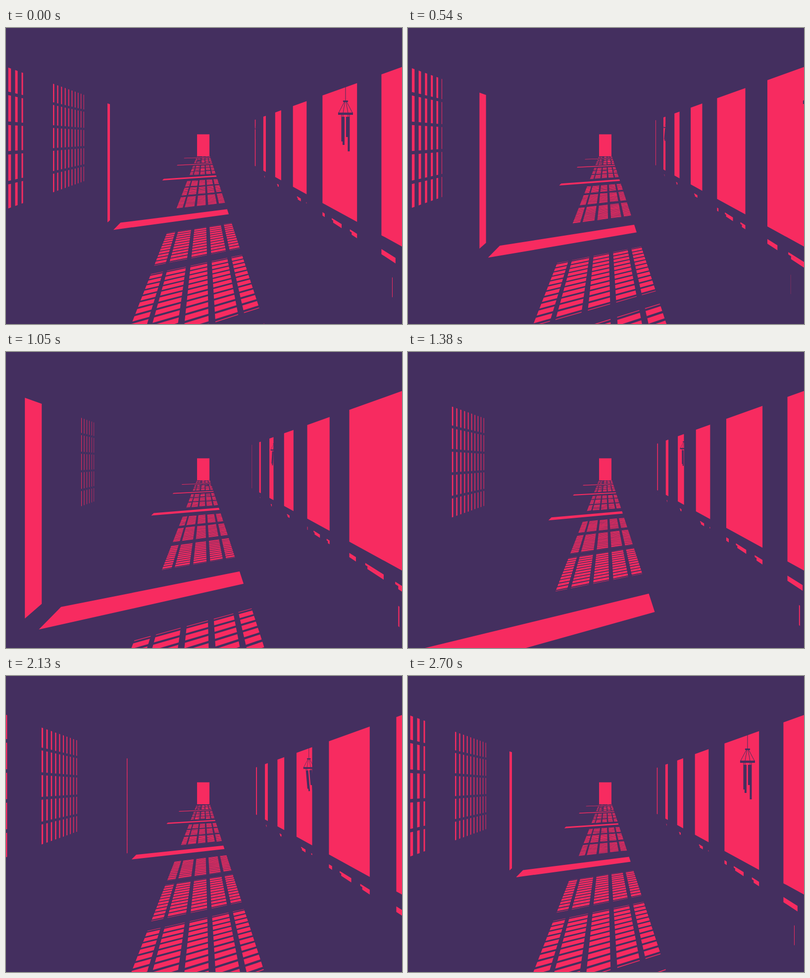
Write an HTML page that moves like this. It is 800x600 px and loops after 2.73 s.

```html
<!DOCTYPE html>
<html>
<head>
<meta charset="utf-8">
<style>
  html, body { margin: 0; height: 100%; overflow: hidden; background: #442f5f; }
  svg { display: block; width: 800px; height: 600px; }
</style>
</head>
<body>
<svg viewBox="0 0 800 600" fill="#f72b60">
  <path d="M386 215.5H411V260H386Z"/>
  <path id="floor"/>
  <path id="walls"/>
  <g id="chimes" fill="#442f5f"></g>
</svg>
<script>
const VX = 400, VY = 223;   // vanishing point
const LOOP = 2730, STEP = 30;
const el = id => document.getElementById(id);
const poly = pts => 'M' + pts.map(p => p.map(n => n.toFixed(2)).join(' ')).join('L') + 'Z';

// Distance from the vanishing point for a plane constant c at depth z.
const reach = (c, z) => 1 / Math.max(c * z, 1 / 420);

// Wall piece between reaches a < b, bounded by rays of slope top and bottom.
const wallPiece = (side, a, b, top, bottom) => a >= b ? '' : poly([
  [VX + side * a, VY + top * a], [VX + side * b, VY + top * b],
  [VX + side * b, VY + bottom * b], [VX + side * a, VY + bottom * a]]);

function rightWall(u) {
  let d = '';
  for (let n = 0; n < 12; n++) {
    const z = .5025 + n / 4 - u;
    if (z <= 0) continue;
    const far = reach(.005552, z), near = reach(.00636, z - .244);
    if (far >= near) continue;
    const piece = (a, b, top, bottom) =>
      wallPiece(1, Math.max(a, far), Math.min(b, near), top, bottom);
    const start = offset => reach(.00579, z - offset);
    const end = offset => reach(.00606, z - offset);
    d += piece(far, near, -.36, .55);
    d += piece(far, end(.076), .628, .657);
    for (const [from, to] of [[.0835, end(.159)], [.1665, near]])
      d += piece(start(from), to, .628, .641) + piece(start(from + .007), to, .641, .657);
  }
  // Slivers between the balusters, five per window
  for (let n = 0; n < 40; n++) {
    const z = .4386 + n / 24 - u;
    if (z < .4 || n % 6 === 1) continue;
    const a = reach(.006, z);
    d += wallPiece(1, a, a + (a - 370) * .1, .743, .848);
  }
  return d;
}

const ROWS = [[-.361, -.238], [-.22, -.085], [-.067, .067], [.085, .22], [.238, .361]];

function leftWall(u) {
  let d = '';
  for (let slot = -2; slot < 5; slot++) {
    if (slot === 1) continue;   // doorway
    const shift = u - slot / 4;
    const limit = .00302 + (.2 - shift) * .00569;
    for (let bar = 0; bar < 11; bar++) {
      const q = .003279 - .00595 * shift + .0000922 * bar;
      if (q < .0022 || q > .00452 || (bar === 0 && q > .0035)) continue;
      const end = Math.min(q + .000035 - .0125 * (q - .0026), limit);
      for (const [top, bottom] of ROWS) d += wallPiece(-1, 1 / end, 1 / q, top, bottom);
    }
  }
  for (const turn of [0, 1]) {
    const near = reach(.00608, .8434 + turn - u), far = reach(.00569, .925 + turn - u);
    d += wallPiece(-1, far, near, -.36, .877);
  }
  return d;
}

const COLUMNS = [[-.389, -.305], [-.277, -.14], [-.105, .025], [.062, .193], [.228, .324]];

function floorLight(v) {
  const point = (k, r) => {
    const y = 1 / (.00627 * Math.max(k + .135 * (r - .324) - v, .05));
    return [VX + r * y, VY + y];
  };
  const beam = (near, far, left, right) =>
    far - v > 4.28 || far - v < .3 ? '' :
    poly([point(near, left), point(far, left), point(far, right), point(near, right)]);
  let d = '';
  for (let turn = 0; turn < 6; turn++) {
    d += beam(turn + 1.033, turn + 1.106, -.983, .324);
    for (const far of [.424, .674, .924])
      for (const [left, right] of COLUMNS) {
        const k = turn + far;
        d += beam(k - .0018, k, left, right);
        for (let i = 0; i < 11; i++) {
          const top = k - .0073 - i * .0184;
          d += beam(top - .0129, top, left, right);
        }
        d += beam(k - .2115, k - .2097, left, right);
      }
  }
  return d;
}

const FRAME = `
  <path d="M0-104V-75M-2-74L-14-51M2-74L14-51M-1-74L-5-51M1-74L5-51" fill="none" stroke="#442f5f"/>
  <path d="M-5-76H5V-73H-5ZM-15-51.5H15V-47H-15Z"/>`;
const TUBES = `
  <path d="M-5-48V-43M5-48V-43M-8-48V-43M8-48V-43" fill="none" stroke="#442f5f"/>
  <path d="M-8.5-43H-2V14H-6V7H-8.5ZM1-43H8.5V27H4.5V-2H1Z"/>`;

function chimes(u) {
  const swing = 5 * Math.sin(2 * Math.PI * u);
  return [.603, 1.603].filter(k => k - u > .3).map(k => {
    const x = reach(.0058, k - u);
    return `<g transform="translate(${VX + x} ${VY}) scale(${x / 286})">${FRAME}
      <g transform="rotate(${swing} 0 -47)">${TUBES}</g></g>`;
  }).join('');
}

function draw() {
  const t = Math.floor(performance.now() % LOOP / STEP) * STEP;
  const u = t / (LOOP - STEP);
  el('floor').setAttribute('d', floorLight(t / (LOOP - STEP / 2)));
  el('walls').setAttribute('d', rightWall(u) + leftWall(u));
  el('chimes').innerHTML = chimes(u);
  requestAnimationFrame(draw);
}
draw();
</script>
</body>
</html>
```
